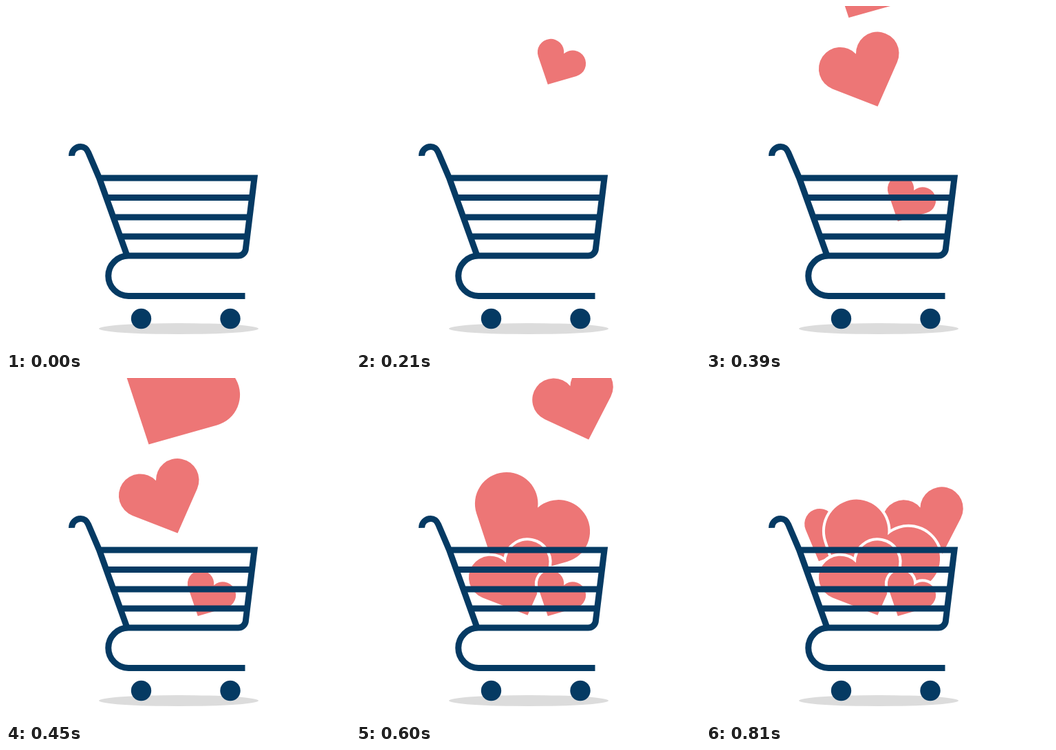
An HTML page with a canvas for the animation above (900 ms loop, 500 by 500 pixels).

```html
<!DOCTYPE html>
<html lang="en">
<head>
<meta charset="utf-8">
<title>Hearts falling into a cart</title>
<style>
  html, body { margin: 0; height: 100%; overflow: hidden; background: #fff; }
  canvas { display: block; }
</style>
</head>
<body>
<canvas id="stage" width="500" height="500"></canvas>
<script>
const LOOP = 900, STEP = 30;
const NAVY = '#053a63', PINK = '#ed7676', GREY = '#dcdcdc';

const ctx = document.getElementById('stage').getContext('2d');

// Two unit circles joined to a tip by their tangents
const heartShape = new Path2D(
  'M0 2.28L-1.627 .722A1 1 0 1 1 0 -.355A1 1 0 1 1 1.627 .722Z');

const cartShape = new Path2D(
  'M95.5 217.8A13 13 0 0 1 108.5 204.5C114 204.5 117 207 119.7 213L135.5 250L175.7 362' +
  'M135.5 250H361L348.5 352A11 11 0 0 1 337.5 363H178A29.25 29.25 0 0 0 178 421.5H347.5' +
  'M146 278.5H357.5M156 307H354M166 335H350.5');

// Back to front: resting place, size, tilt, landing time, fall per step
const hearts = [
  { x: 184,   y: 220.2, size: 22,   tilt: 23.6,  land: 810, fall: 40 },
  { x: 315,   y: 199,   size: 31.2, tilt: -19,   land: 720, fall: 44.2 },
  { x: 256.5, y: 242.5, size: 45.8, tilt: 28,    land: 630, fall: 39.7 },
  { x: 222.2, y: 278.8, size: 31.3, tilt: -22.5, land: 540, fall: 39.75 },
  { x: 299,   y: 307.2, size: 19.2, tilt: 27.5,  land: 420, fall: 33.13 }
];

function fillEllipse(x, y, rx, ry, color) {
  ctx.fillStyle = color;
  ctx.beginPath();
  ctx.ellipse(x, y, rx, ry, 0, 0, 2 * Math.PI);
  ctx.fill();
}

function drawHeart({ x, y, size, tilt, land, fall }, time) {
  const height = Math.max(0, land - time) / STEP * fall;
  ctx.save();
  ctx.translate(x, y - height);
  ctx.rotate(tilt * Math.PI / 180);
  ctx.scale(size, size);
  ctx.lineWidth = 8 / size;
  ctx.strokeStyle = '#fff';
  ctx.stroke(heartShape);
  ctx.fillStyle = PINK;
  ctx.fill(heartShape);
  ctx.restore();
}

function drawCart() {
  ctx.lineWidth = 9;
  ctx.strokeStyle = NAVY;
  ctx.stroke(cartShape);
  fillEllipse(196.5, 454.5, 14.7, 14.7, NAVY);
  fillEllipse(326, 454.5, 14.7, 14.7, NAVY);
}

function draw(now) {
  const time = Math.floor(now % LOOP / STEP) * STEP;
  ctx.clearRect(0, 0, 500, 500);
  fillEllipse(251, 469, 116, 8, GREY);
  for (const heart of hearts) drawHeart(heart, time);
  drawCart();
  requestAnimationFrame(draw);
}
requestAnimationFrame(draw);
</script>
</body>
</html>
```
